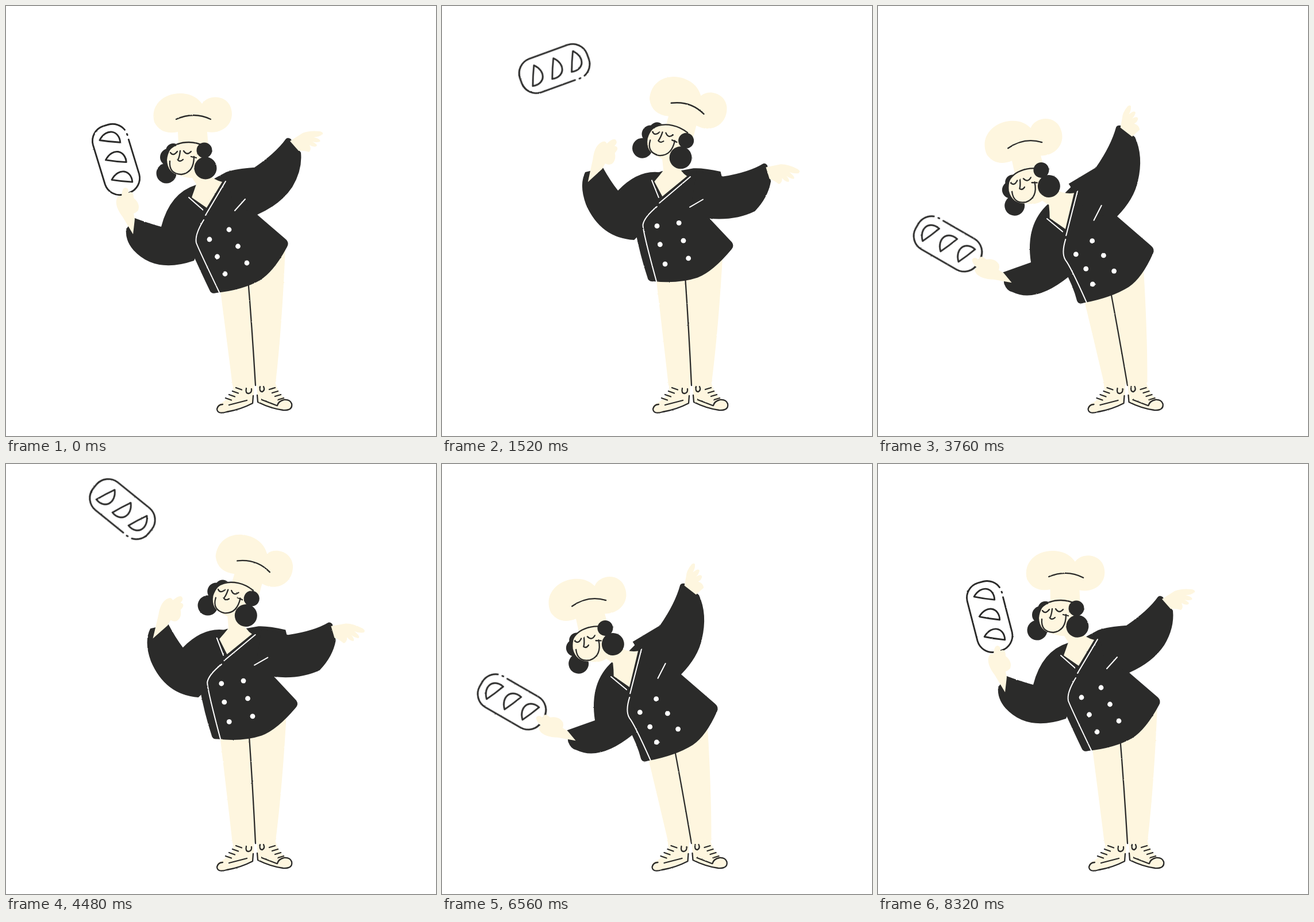
Recreate the animation shown at these times as an HTML page. Size 748 by 748 pixels, loop 8.4 s.

```html
<!DOCTYPE html>
<html lang="en">
<head>
<meta charset="utf-8">
<title>Chef tossing bread</title>
<style>
html, body { margin: 0; width: 100%; height: 100%; overflow: hidden; background: #fff; }
svg { display: block; width: 100vw; height: 100vh; }
.cream { fill: #fef6df; }
.ink { fill: #2b2b2a; }
.white { fill: #fff; }
.line, .seam { fill: none; stroke: #2b2b2a; stroke-width: 2.3; stroke-linecap: round; stroke-linejoin: round; }
.seam { stroke: #fff; stroke-width: 2; }
.bread .line { stroke-width: 2.9; }
</style>
</head>
<body>
<svg viewBox="0 0 748 748">
  <defs>
    <filter id="rough" filterUnits="userSpaceOnUse" x="0" y="0" width="748" height="748" color-interpolation-filters="sRGB">
      <feTurbulence type="fractalNoise" baseFrequency=".35" numOctaves="1" seed="4"/>
      <feDisplacementMap in="SourceGraphic" scale="2" xChannelSelector="R" yChannelSelector="G"/>
    </filter>
  </defs>
  <g id="stage" filter="url(#rough)"></g>
</svg>
<script>
const NS = 'http://www.w3.org/2000/svg';
const stage = document.getElementById('stage');
const STEP = 80, CYCLE = 2800, TOSS = 1280, CATCH = 2320;
const parts = [];

// Joints of the figure: place at rest, bent low, and stretched high
const trunk = {
  hemL: [[358, 500], [350, 518], [360, 478]],
  hemR: [[490, 414], [479, 425], [506, 419]],
  pitL: [[326, 442], [331, 470], [334, 405]],
  pitR: [[437, 363], [416, 366], [466, 370]],
  throat: [[349, 351], [326, 388], [384, 331]],
  collarL: [[318, 333], [294, 370], [366, 303]],
  collarR: [[382, 305], [347, 322], [433, 297]],
  face: [[304, 262], [250, 311], [384, 229]],
  hat: [[325, 238], [262, 284], [414, 219]]
};
const limbs = {
  shoulder: [[432, 281], [379, 281], [490, 297]],
  elbowR: [[498, 315], [452, 305], [545, 358]],
  cuffR: [[489, 230], [416, 209], [562, 275]],
  wristR: [[513, 255], [447, 228], [573, 306]],
  tipR: [[551, 219], [437, 172], [624, 288]],
  crook: [[270, 384], [266, 446], [307, 320]],
  elbowL: [[240, 446], [247, 505], [268, 380]],
  cuffL: [[224, 370], [218, 464], [281, 281]],
  wristL: [[210, 390], [221, 484], [250, 290]],
  tipL: [[207, 317], [165, 441], [303, 232]]
};
const joints = { ...trunk, ...limbs };
const now = {};

const JACKET = ['hemL', 'hemR', 'pitL', 'pitR', 'throat', 'collarL', 'collarR'];
const SLEEVE_R = ['shoulder', 'elbowR', 'cuffR', 'wristR', 'pitR'];
const SLEEVE_L = ['collarL', 'crook', 'elbowL', 'cuffL', 'wristL', 'pitL'];
const HAND_R = ['cuffR', 'wristR', 'tipR'];
const HAND_L = ['cuffL', 'wristL', 'tipL'];
const NECK = ['throat', 'collarL', 'collarR', 'face'];

// Curve through low (-1), rest (0) and high (1)
const mix = (rest, low, high, s) =>
  rest + (high - low) / 2 * s + ((high + low) / 2 - rest) * s * s;

// Carry a point along with its joints: nearest joints count most, turning is kept
function bend(x, y, names) {
  const pins = names.map(n => {
    const [px, py] = joints[n][0], [qx, qy] = now[n];
    return { px, py, qx, qy, w: 1 / ((x - px) ** 2 + (y - py) ** 2 + .01) };
  });
  const sum = f => pins.reduce((total, pin) => total + pin.w * f(pin), 0);
  const all = sum(() => 1), mean = key => sum(pin => pin[key]) / all;
  const px = mean('px'), py = mean('py'), qx = mean('qx'), qy = mean('qy');
  const size = sum(i => (i.px - px) ** 2 + (i.py - py) ** 2);
  const re = sum(i => (i.px - px) * (i.qx - qx) + (i.py - py) * (i.qy - qy)) / size;
  const im = sum(i => (i.px - px) * (i.qy - qy) - (i.py - py) * (i.qx - qx)) / size;
  return [qx + re * (x - px) - im * (y - py), qy + re * (y - py) + im * (x - px)];
}

function add(tag, cls, attrs = {}, parent = stage) {
  const el = document.createElementNS(NS, tag);
  el.setAttribute('class', cls);
  for (const k in attrs) el.setAttribute(k, attrs[k]);
  return parent.appendChild(el);
}
const path = (cls, d, parent) => add('path', cls, { d }, parent);

// A path that bends with its joints
function skin(cls, names, d) {
  const el = path(cls, d);
  parts.push(() => el.setAttribute('d', d.replace(/([\d.]+),([\d.]+)/g,
    (m, x, y) => bend(+x, +y, names).map(v => v.toFixed(1)).join(','))));
}

// A rigid group placed by a transform
function group(cls, place) {
  const el = add('g', cls);
  parts.push(p => el.setAttribute('transform', place(p)));
  return el;
}

// A lock of hair that turns about the face
function lock(r, x, y, loose) {
  const [cx, cy] = trunk.face[0];
  const g = group('hair', p =>
    `translate(${now.face[0]} ${now.face[1]}) rotate(${22 * p.body + loose * Math.min(p.sway, 1.3)})`);
  add('circle', 'ink', { r, cx: x - cx, cy: y - cy }, g);
}

// Legs lean from the ankles
const legs = group('legs', p => {
  const lean = mix(0, -.11, .012, p.body);
  return `matrix(1 0 ${-lean} 1 ${660 * lean} 0)`;
});
path('cream', 'M369,465L486,420Q480,560 469,655L434,658L394,660Q384,580 369,465Z', legs);
path('line', 'M421,475Q428,560 434,660', legs);

// Shoes
const shoes = group('shoes', p => `translate(${Math.min(0, p.body) * 1.5} 0)`);
path('cream', 'M394,655L432,655L430,690Q405,700 378,708Q364,706 368,694Q385,686 396,672Z' +
  'M436,655L468,653Q474,680 494,688Q500,700 488,704Q460,700 438,690Z', shoes);
path('line', 'M430,678L429,691Q408,702 384,706Q368,711 367,701Q369,693 377,693M388,694L419,686' +
  'M437,677L438,689Q460,700 482,703Q499,704 497,692Q494,684 484,685Q474,687 472,695M445,685L471,695', shoes);
path('line', 'M418,665Q416,674 422,674Q428,673 427,666M442,662Q440,671 446,671Q451,668 448,662', shoes);
for (let i = 0; i < 4; i++) {
  path('line', `M${400 - 6 * i},${664 + 6 * i}l10,3.5M${458 + 5 * i},${667 + 6 * i}l10,-3`, shoes);
}

// The hat tips over and stretches a little with it
const hat = group('hat', p => {
  const turn = mix(0, -10, 19, p.body) + 12 * p.sway;
  return `translate(${now.hat}) rotate(${turn}) scale(1 ${1 + .003 * Math.abs(turn)}) translate(-325 -238)`;
});
path('cream', 'M300,241L299,219Q270,225 258,202C250,172 275,151 305,152C325,153 335,162 341,170' +
  'C350,155 380,153 390,174C401,200 380,224 350,219L352,246Q325,240 300,241Z', hat);
path('line', 'M296,197Q327,183 356,197', hat);

lock(15, 283, 263, 13);
lock(17.5, 279, 291, 31);
lock(13, 291, 252, 5);

// Jacket
skin('ink', JACKET, 'M331,311L299,336L322,425Q340,465 354,494Q357,502 366,499Q412,494 442,477' +
  'Q466,462 489,419Q493,412 487,406L437,363L450,310L432,281Q400,283 383,289L357,303Z');
skin('ink', SLEEVE_R, 'M432,281Q470,255 487,231Q490,228 495,231L513,255Q516,285 498,315Q478,345 437,363L395,345L383,290Z');
skin('ink', SLEEVE_L, 'M331,311Q285,325 270,384Q248,378 224,369L209,388Q207,408 222,425Q260,466 327,443L345,400Z');

skin('cream', NECK, 'M318,290L331,310Q327,322 323,333L349,351L376,306Q362,303 350,290Z');

// Face
const head = group('face', p => `translate(${now.face}) rotate(${12 * p.body}) translate(-304 -262)`);
path('cream', 'M300,238Q282,246 280,268Q281,291 303,295Q330,305 340,290L338,238Z', head);
path('line', 'M285,270Q283,292 305,293Q327,290 327,262M303,252Q302,262 299,268Q303,272 308,267', head);
path('line', 'M286,255Q291,262 298,253M309,252Q315,261 322,253M322,262L331,264', head);

lock(13.5, 345, 251, 0);
lock(19.5, 347, 282, 3);
path('line', 'M284,250Q296,237 318,237Q332,237 346,244', head);

// Seams and buttons
skin('seam', JACKET, 'M344,372Q328,398 331,412Q336,425 371,498');
skin('seam', JACKET, 'M318,333L343,355M382,305L347,364M416,336L398,356');
for (let i = 0; i < 3; i++) {
  for (const [x, y] of [[354 + 13.5 * i, 406 + 30 * i], [388 + 15.5 * i, 389 + 29 * i]]) {
    const el = add('circle', 'white', { r: 4.4 });
    parts.push(() => {
      const [cx, cy] = bend(x, y, JACKET);
      el.setAttribute('cx', cx);
      el.setAttribute('cy', cy);
    });
  }
}

// Bread
const bread = group('bread', p => `translate(${p.bread[0]} ${p.bread[1]}) rotate(${p.bread[2] - 90})`);
add('rect', 'white', { x: -31, y: -62, width: 62, height: 124, rx: 27 }, bread);
path('line', 'M31,-27V36A27 27 0 0 1 5,62H-5A27 27 0 0 1 -31,36V-36A27 27 0 0 1 -5,-62H5A27 27 0 0 1 29.5,-45M31,-37l.3,2', bread);
for (let i = -1; i < 2; i++) {
  add('path', 'line', {
    d: 'M-18,5Q0,6 18,5C14,-16 -9,-18 -18,5Z', transform: `translate(1 ${36 * i - 2}) rotate(23)`
  }, bread);
}

// Hands
skin('cream', HAND_L, 'M221,397L203,367Q190,350 192,338Q194,328 201,331Q202,316 208,316Q214,317 213,325' +
  'Q222,320 222,334Q231,341 231,350Q231,358 222,361L224,371Z');
skin('cream', HAND_R, 'M494,235L516,221Q528,216 546,218Q552,219 551,223Q545,228 535,228Q549,232 546,236' +
  'Q540,238 533,236Q543,241 540,244Q535,246 528,242Q532,250 527,254Q518,251 509,252Z');

// Eased value from [time, value] steps
function ease(keys, t) {
  const i = keys.findIndex(k => k[0] > t);
  const [t0, a] = keys[i - 1], [t1, b] = keys[i];
  return a + (b - a) * (1 - Math.cos(Math.PI * (t - t0) / (t1 - t0))) / 2;
}
const swing = [[0, 0], [860, -1], [960, -1], [1580, 1.03], [1760, 1]];
const bodyKeys = [...swing, [2480, 0], [CYCLE, 0]];
const armKeys = [...swing, [2720, 0], [CYCLE, 0]];
const swayKeys = [[0, 0], [1760, 0], [CATCH, 2], [CYCLE, 0]];

// Centre and angle of the bread: held, thrown, then settling in the hand
function breadAt(t, s) {
  if (t < TOSS) return [191.5 + 70 * s, 267 - 147 * s, 73 + 43 * s];
  if (t < CATCH) {
    const k = (t - 1520) / STEP;
    return [195.5 + 3.5 * k, 73 + 3.4 * ((t - 1780) / STEP) ** 2, 160 + 29.5 * k];
  }
  const u = (CYCLE - t) / (CYCLE - CATCH);
  return [191.5 + 14 * u + 13 * u * u, 267 - 6 * u - 16 * u * u, 73 + 14 * u + 6 * u * u];
}

function draw(t) {
  const p = { body: ease(bodyKeys, t), arms: ease(armKeys, t), sway: ease(swayKeys, t) };
  p.bread = breadAt(t, p.arms);
  for (const name in joints) {
    const [rest, low, high] = joints[name], s = name in limbs ? p.arms : p.body;
    now[name] = rest.map((v, i) => mix(v, low[i], high[i], s));
  }
  parts.forEach(update => update(p));
}

const start = performance.now();
let shown = -1;
function tick() {
  const t = Math.floor((performance.now() - start) / STEP) * STEP % CYCLE;
  if (t !== shown) draw(shown = t);
  requestAnimationFrame(tick);
}
tick();
</script>
</body>
</html>
```
